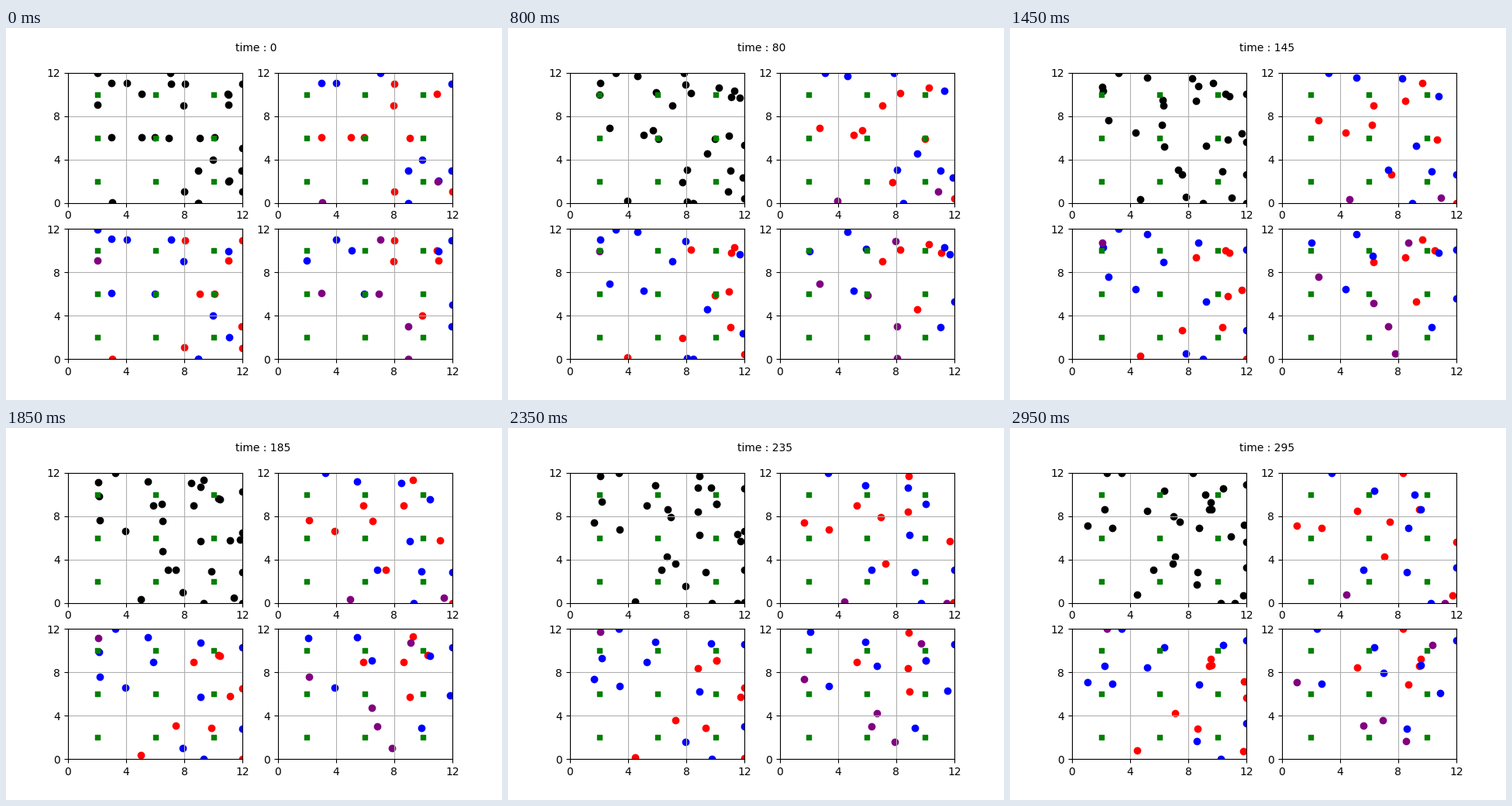
Animation of 640 by 480 pixels, one loop 3 s. Source, as a matplotlib script:

```python
import numpy as np
import matplotlib.pyplot as plt
from matplotlib.animation import FuncAnimation

FRAMES, INTERVAL, STEP = 60, 50, 5
SIZE, SPEED = 12, 0.0113
COLORS = {"r": "red", "b": "blue", "p": "purple"}

walkers = []


def walker(groups, x, y, heading, *turns):
    """Start on the lattice; turns are (time, new heading in degrees)."""
    walkers.append((groups, (x, y), [(-STEP, heading), *turns]))


def position(start, legs, t):
    """Walk each leg at constant speed, sliding along the walls."""
    pos = np.array(start, float)
    ends = [time for time, _ in legs[1:]] + [np.inf]
    for (begin, heading), end in zip(legs, ends):
        length = SPEED * max(0, min(t, end) - begin)
        a = np.radians(heading)
        pos = np.clip(pos + length * np.array([np.cos(a), np.sin(a)]), 0, SIZE)
    return pos


def positions(t):
    return np.array([position(start, legs, t) for _, start, legs in walkers])


walker("-b-", 2, 12, -86)
walker("bb-", 3, 11, 83)
walker("bbb", 4, 11, 48, (100, -45))
walker("--b", 5, 10, 12, (77, -64))
walker("-pb", 2, 9, 88, (235, 63))
walker("rbp", 3, 6, 107, (157, 205))
walker("r--", 5, 6, 45, (235, -43))
walker("rbb", 6, 6, 164)
walker("--p", 7, 6, 188, (80, -69))
walker("b--", 7, 12, 30, (87, -58))
walker("-bp", 7, 11, -8)
walker("rrr", 8, 11, -73, (235, 17))
walker("rbr", 8, 9, 181, (250, -83))
walker("rr-", 9, 6, -6)
walker("-r-", 10, 6, 13, (247, 110))
walker("r-r", 11, 10, 142)
walker("-bb", 11, 10, -54, (50, 31))
walker("-rr", 11, 9, 64, (57, 147), (135, 242), (250, 145))
walker("brb", 12, 11, 224)
walker("--b", 12, 5, 20, (161, 126), (240, 203))
walker("bbr", 10, 4, 173, (32, 107))
walker("b-p", 9, 3, 179)
walker("brb", 12, 3, 183)
walker("p--", 11, 2, 262, (130, 0), (190, 272), (235, 245))
walker("bb-", 11, 2, 22)
walker("rr-", 8, 1, 106)
walker("rr-", 12, 1, 10, (15, -57), (228, 110))
walker("pr-", 3, 0, 10, (179, 201), (237, 89))
walker("bb-", 9, 0, 236, (81, -43))
walker("-bp", 9, 0, 175, (106, 83), (240, 4))

fig, axes = plt.subplots(2, 2, figsize=(6.4, 4.8), dpi=100)
axes = axes.ravel()
posts = np.array([(x, y) for x in (2, 6, 10) for y in (2, 6, 10)])
start = positions(0)
layers = []


def add_dots(ax, index, color):
    layers.append((ax.scatter(*start[index].T, c=color, zorder=1), index))


for k, ax in enumerate(axes):
    ticks = range(0, SIZE + 1, 4)
    ax.set(xlim=(0, SIZE), ylim=(0, SIZE), xticks=ticks, yticks=ticks)
    ax.grid(True)
    if k == 0:
        add_dots(ax, list(range(len(walkers))), "black")
    else:
        for key, color in COLORS.items():
            add_dots(ax, [i for i, w in enumerate(walkers) if w[0][k - 1] == key], color)
    ax.scatter(*posts.T, s=15, c="green", marker="s", zorder=1)

clock = axes[0].text(11.5, 14, "time : 0")


def update(i):
    t = i * STEP
    xy = positions(t)
    for dots, index in layers:
        dots.set_offsets(xy[index])
    clock.set_text(f"time : {t}")
    return [clock] + [dots for dots, _ in layers]


anim = FuncAnimation(fig, update, frames=FRAMES, interval=INTERVAL, repeat=True, repeat_delay=0)
plt.show()
```
